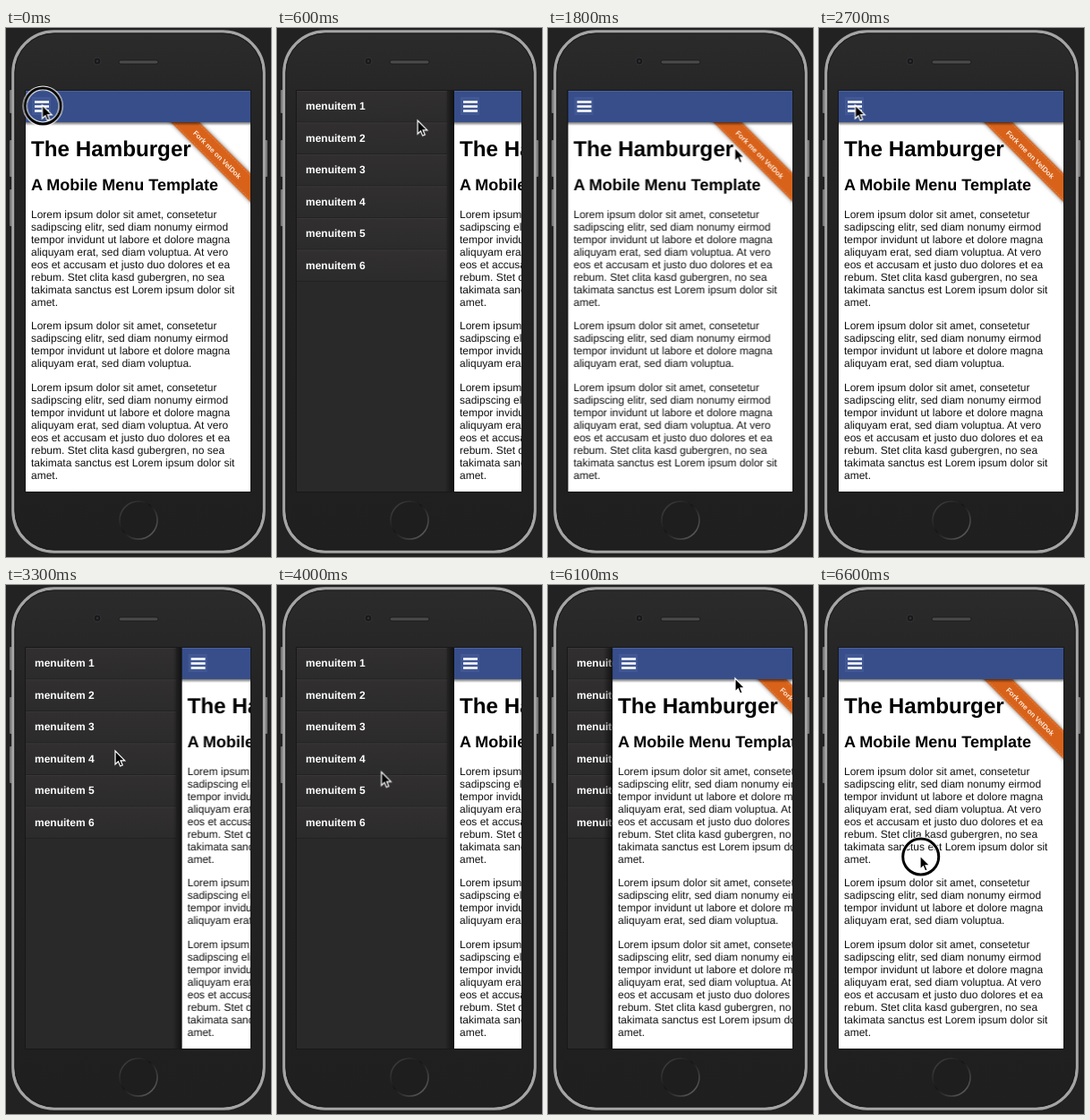
An HTML page that plays this animation: 296x590 px, repeating every 6700 ms.

```html
<!DOCTYPE html>
<html lang="en">
<head>
<meta charset="utf-8">
<title>The Hamburger</title>
<style>
  html, body { margin: 0; width: 100%; height: 100%; overflow: hidden; background: #222; }
  svg {
    display: block; width: 296px; height: 590px;
    font-family: "Liberation Sans", Arial, sans-serif; text-rendering: geometricPrecision;
  }
  .page, .pointer, .ring { animation: 6.7s infinite; }
  .page { animation-name: slide; animation-timing-function: ease; }
  .pointer { animation-name: roam; animation-timing-function: ease-in-out; }
  .ring { animation-name: press; animation-timing-function: step-end; }
  .bold { font-weight: bold; }
  .band { filter: drop-shadow(0 0 2px rgba(0, 0, 0, .5)); }

  @keyframes slide {
    0%, .896% { transform: translate(0); }
    8.358%, 19.925% { transform: translate(176px); }
    27.388%, 42.687% { transform: translate(0); }
    50.149%, 87.896% { transform: translate(176px); }
    95.358%, 100% { transform: translate(0); }
  }
  @keyframes roam {
    0%, 3.73% { transform: translate(40.5px, 86px); }
    10.45% { transform: translate(170px, 105px); }
    17.16%, 23.13% { transform: translate(215px, 90px); }
    31.34% { transform: translate(200px, 192px); }
    39.55%, 44.03% { transform: translate(40.5px, 86px); }
    49.25% { transform: translate(122px, 185px); }
    55.97% { transform: translate(104px, 230px); }
    62.69% { transform: translate(125px, 194px); }
    70.15% { transform: translate(263px, 352px); }
    73.13%, 74.63% { transform: translate(268px, 337px); }
    83.58% { transform: translate(226px, 106px); }
    86.57%, 91.04% { transform: translate(209px, 104px); }
    97.01%, 100% { transform: translate(113px, 302px); }
  }
  @keyframes press {
    0%, 17.8%, 41%, 70.9%, 85.8%, 97.7%, 100% { opacity: 1; }
    2.2%, 20.8%, 44%, 73.9%, 88% { opacity: 0; }
  }
</style>
</head>
<body>
<svg viewBox="0 0 296 590">
  <defs>
    <clipPath id="screen"><rect x="22" y="70" width="251" height="447"/></clipPath>
    <clipPath id="body"><rect x="22" y="105" width="251" height="412"/></clipPath>
    <linearGradient id="case" x2="0" y2="1">
      <stop offset="0" stop-color="#2b2b2b"/>
      <stop offset=".2" stop-color="#232323"/>
      <stop offset="1" stop-color="#1f1f1f"/>
    </linearGradient>
    <linearGradient id="side">
      <stop offset="0" stop-opacity="0"/>
      <stop offset="1" stop-opacity=".6"/>
    </linearGradient>
    <linearGradient id="under" x2="0" y2="1">
      <stop offset="0" stop-opacity=".55"/>
      <stop offset="1" stop-opacity="0"/>
    </linearGradient>
    <linearGradient id="row" x2="0" y2="1">
      <stop offset="0" stop-color="#312f30"/>
      <stop offset="1" stop-color="#2c2b2b"/>
    </linearGradient>
    <linearGradient id="home" x2="1" y2="1">
      <stop offset="0" stop-color="#4a4a4a"/>
      <stop offset=".45" stop-color="#161616"/>
      <stop offset="1" stop-color="#6a6a6a"/>
    </linearGradient>
  </defs>

  <rect width="296" height="590" fill="#222"/>
  <g fill="#777">
    <rect x="4" y="69" width="3" height="26" rx="1"/>
    <rect x="4" y="125" width="3" height="41" rx="1"/>
    <rect x="4" y="180" width="3" height="41" rx="1"/>
    <rect x="289" y="125" width="3" height="41" rx="1"/>
  </g>
  <rect x="7.8" y="3.8" width="280.4" height="580.4" rx="46" fill="url(#case)" stroke="#a5a5a5" stroke-width="3.2"/>
  <rect x="10" y="6" width="276" height="576" rx="44" fill="none" stroke="#1a1a1a"/>
  <circle cx="102" cy="37" r="4" fill="#181818" stroke="#333"/>
  <circle cx="102" cy="37" r="1.4" fill="#30303c"/>
  <rect x="126" y="36" width="44" height="4" rx="2" fill="#4a4a4a" stroke="#171717" stroke-width=".8"/>
  <circle cx="148" cy="549" r="21" fill="#1e1e1e" stroke="url(#home)" stroke-width="1.6"/>
  <rect x="21.5" y="69.5" width="252" height="448" fill="#292929" stroke="#181818"/>

  <g clip-path="url(#screen)">
    <g id="menu" class="bold" font-size="12" fill="#fff"></g>
    <g class="page">
      <rect x="12" y="70" width="10" height="447" fill="url(#side)"/>
      <rect x="22" y="70" width="251" height="447" fill="#fff"/>
      <text class="bold" x="28" y="143" font-size="24.2">The Hamburger</text>
      <text class="bold" x="28" y="181" font-size="18">A Mobile Menu Template</text>
      <g id="copy" font-size="12" fill="#111"></g>
      <g clip-path="url(#body)">
        <g transform="translate(236 141) rotate(45)">
          <rect class="band" x="-80" y="-11.3" width="160" height="22.6" fill="#d8621a"/>
          <path d="M-80-9.5H80M-80 9.5H80" stroke="#e69a68" stroke-width=".7" stroke-dasharray="2 1.5"/>
          <text class="bold" y="3" font-size="8" fill="#fbe9dc" text-anchor="middle">Fork me on VelDok</text>
        </g>
      </g>
      <rect x="22" y="105" width="251" height="4" fill="url(#under)"/>
      <rect x="22" y="70" width="251" height="35" fill="#374e8a"/>
      <rect x="22" y="70" width="251" height="1" fill="#4a60a0"/>
      <rect x="29" y="77" width="21" height="20" fill="#415894"/>
      <path d="M32 82.5H48M32 87.5H48M32 92.5H48" stroke="#fff" stroke-width="2.4"/>
    </g>
  </g>

  <g class="pointer">
    <g class="ring" fill="none">
      <circle cx=".7" cy="1" r="20" stroke="#fff" stroke-width="5"/>
      <circle cx=".7" cy="1" r="20" stroke="#000" stroke-width="3"/>
    </g>
    <path d="M0 0V15L3.4 11.8 5.6 17 8.2 15.9 6 10.8H10.7Z" stroke="#fff" stroke-width="1.2"/>
  </g>
</svg>
<script>
  const long = [
    'Lorem ipsum dolor sit amet, consetetur',
    'sadipscing elitr, sed diam nonumy eirmod',
    'tempor invidunt ut labore et dolore magna',
    'aliquyam erat, sed diam voluptua. At vero',
    'eos et accusam et justo duo dolores et ea',
    'rebum. Stet clita kasd gubergren, no sea',
    'takimata sanctus est Lorem ipsum dolor sit',
    'amet.'
  ];
  const short = [...long.slice(0, 3), 'aliquyam erat, sed diam voluptua.'];

  const paragraph = (lines, top) =>
    lines.map((line, i) => `<text x="28" y="${top + i * 14}">${line}</text>`).join('');
  document.getElementById('copy').innerHTML =
    paragraph(long, 212) + paragraph(short, 336) + paragraph(long, 405);

  const pitch = 35.5;
  const menuItem = (_, i) => {
    const y = 70 + i * pitch;
    return `<rect x="22" y="${y}" width="168" height="${pitch}" fill="url(#row)"/>
      <rect x="22" y="${y}" width="168" height="1" fill="#383637"/>
      <rect x="22" y="${y + pitch - 1}" width="168" height="1" fill="#222"/>
      <text x="32" y="${y + 21}">menuitem ${i + 1}</text>`;
  };
  document.getElementById('menu').innerHTML = Array.from({ length: 6 }, menuItem).join('');
</script>
</body>
</html>
```
